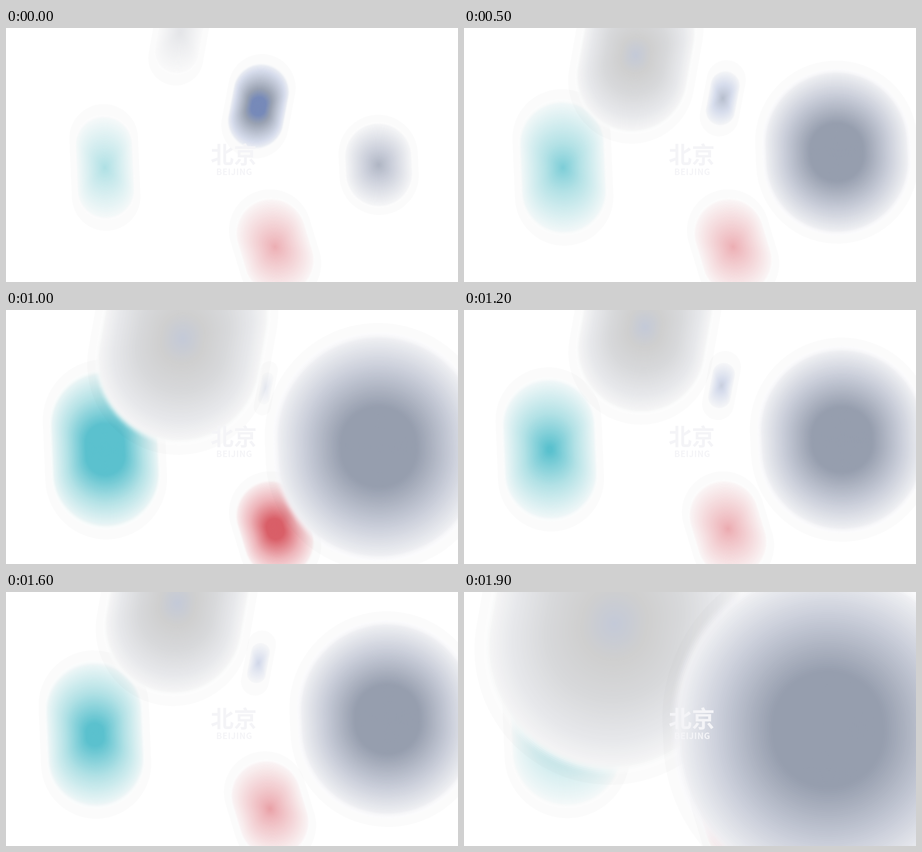
An HTML page with a canvas for the animation above (2000 ms loop, 900x506 px).

```html
<!DOCTYPE html>
<html lang="zh">
<head>
<meta charset="utf-8">
<style>
  html, body { margin: 0; width: 100%; height: 100%; overflow: hidden; background: #fff; }
  canvas { display: block; }
</style>
</head>
<body>
<canvas id="stage" width="900" height="506"></canvas>
<script>
const ctx = document.getElementById('stage').getContext('2d');
const LOOP = 2000, STEP = 100, LAYERS = 90, RIM = 8, EDGE = .1;

// Shared beat that drives every blob: [time in ms, size].
const BEAT = [[0, 79], [300, 242], [700, 81], [1000, 226], [1400, 139], [1600, 194], [1900, 329], [2000, 79]];

const clamp = v => Math.max(0, Math.min(1, v));
const mix = (a, b, k) => a + (b - a) * k;
const toRgb = hex => [0, 2, 4].map(i => parseInt(hex.slice(i, i + 2), 16));
const grow = (radius, full) => clamp(radius / full) ** 1.7;
const flare = (size, base, peak, width) => base + (1 - base) * Math.exp(-(((size - peak) / width) ** 2));

// smear: half of the motion streak; colors: rim to core, evenly spaced up to the intensity `reach`.
// wave(cycles, peak) is a cosine over the loop with its crest at the given phase.
const blobs = [
  { // teal
    smear: [2.5, 58], reach: .65, colors: ['fbfbfb', 'b4e2e6', '5bc1ce'],
    radius: size => Math.min(125, 40 + size * .36),
    glow: size => flare(size, .35, 235, 65),
    place: (size, wave) => [187 + 17 * wave(4, .85), 275 + 9 * wave(4, .2)]
  },
  { // red
    smear: [10, 33], reach: .65, colors: ['fbfbfb', 'eeb6bb', 'd95f68'],
    radius: () => 82,
    glow: size => flare(size, .36, 242, 30),
    place: (size, wave) => [533 + 9 * wave(4, .8), 438 - 6 * wave(4, .2)]
  },
  { // blue
    smear: [-7, 37], reach: .65, colors: ['f9f9f9', 'd6dcec', 'b9c0cf', '9aa2b2', '778ab9'],
    radius: size => Math.max(0, 94 - size * .34),
    glow: size => grow(94 - size * .34, 74),
    place: (size, wave) => [510 + 9 * wave(1, .4), 148 + 8 * wave(2, 0)]
  },
  { // grey
    smear: [-9, 51], reach: 1, colors: ['fbfbfb', 'e6e7ea', 'd7d8da', 'cfcfcf', 'c3c9d8'],
    radius: size => size * .86 - 13,
    glow: size => grow(size * .86 - 13, 115),
    place: (size, wave) => [380 - size * .2 + 18 * wave(1, .55), size * .24 - 4 + 20 * wave(1, .3)]
  },
  { // slate
    smear: [1, 21], reach: .65, colors: ['fbfbfb', 'c9cdd9', '969eae'],
    radius: size => size,
    glow: size => grow(size, 120),
    place: (size, wave) => [742 + 18 * wave(4, .25), 260 + 14 * wave(2, -.07)]
  }
];
for (const blob of blobs) blob.colors = blob.colors.map(toRgb);

function beatAt(time) {
  const next = BEAT.findIndex(([at]) => at > time);
  const [t0, from] = BEAT[next - 1], [t1, to] = BEAT[next];
  return mix(from, to, (time - t0) / (t1 - t0));
}

function shade(colors, level) {
  const pos = clamp(level) * (colors.length - 1);
  const i = Math.min(Math.floor(pos), colors.length - 2);
  return colors[i].map((v, c) => Math.round(mix(v, colors[i + 1][c], pos - i)));
}

function streak(x, y, dx, dy, radius, color) {
  ctx.strokeStyle = color;
  ctx.lineWidth = radius * 2;
  ctx.beginPath();
  ctx.moveTo(x - dx, y - dy);
  ctx.lineTo(x + dx, y + dy);
  ctx.stroke();
}

// Nested streaks that shrink to a round core.
function drawBlob(blob, size, wave) {
  const r = blob.radius(size);
  if (r <= 0) return;
  const [x, y] = blob.place(size, wave);
  const [dx, dy] = blob.smear;
  const glow = blob.glow(size) / blob.reach;
  const inner = r - Math.min(RIM, r * .3);
  streak(x, y, dx, dy, r, 'rgba(0,0,0,.015)');
  for (let i = 1; i < LAYERS; i++) {
    const depth = i / LAYERS;
    const radius = inner * (1 - depth);
    const stretch = (radius / r) ** 1.3;
    const alpha = clamp((depth / EDGE) ** 2);
    streak(x, y, dx * stretch, dy * stretch, radius, `rgba(${shade(blob.colors, glow * depth)},${alpha})`);
  }
}

function label(text, x, y, size, spacing) {
  ctx.font = `bold ${size}px "Noto Sans CJK SC", "Noto Sans CJK", sans-serif`;
  ctx.letterSpacing = spacing + 'px';
  ctx.fillText(text, x, y);
}

function draw(time) {
  const size = beatAt(time);
  const wave = (cycles, peak) => Math.cos(2 * Math.PI * (cycles * time / LOOP - peak));
  ctx.fillStyle = '#fff';
  ctx.fillRect(0, 0, 900, 506);
  ctx.lineCap = 'round';
  for (const blob of blobs) drawBlob(blob, size, wave);
  ctx.fillStyle = '#f4f4f7';
  ctx.textAlign = 'center';
  label('北京', 453.5, 269, 46, 0);
  label('BEIJING', 454.5, 293, 17, .6);
}

let shown = -1;
const start = performance.now();
function tick() {
  const elapsed = performance.now() - start;
  const time = Math.floor((elapsed % LOOP) / STEP) * STEP;
  if (time !== shown) draw(shown = time);
  requestAnimationFrame(tick);
}
tick();
</script>
</body>
</html>
```
